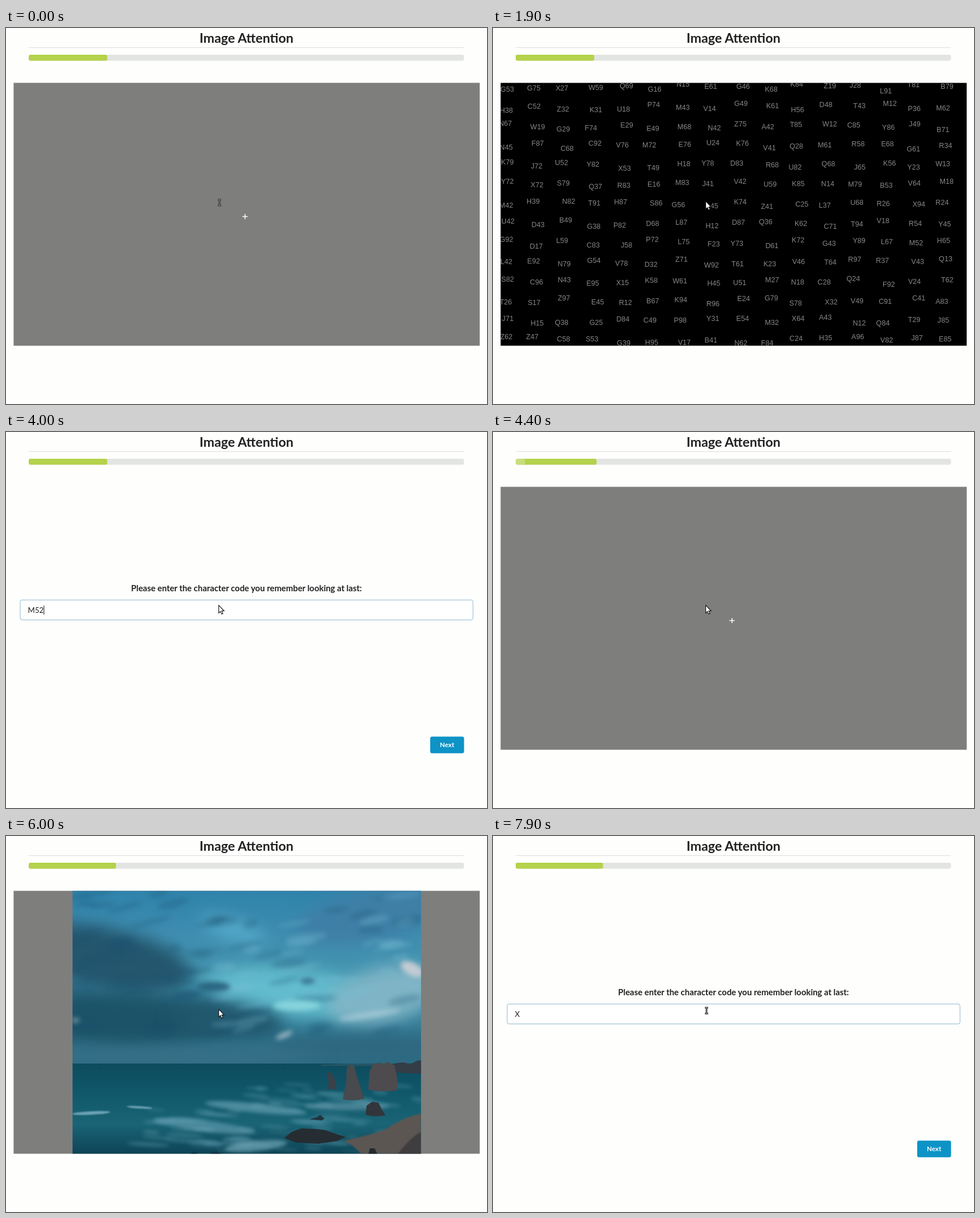
An HTML page with a canvas that plays this animation: 847 by 661 pixels, repeating every 8000 ms.

```html
<!DOCTYPE html>
<html lang="en">
<head>
<meta charset="utf-8">
<title>Image Attention</title>
<style>
html, body { margin: 0; width: 100%; height: 100%; overflow: hidden; background: #fefefd; }
svg, canvas { position: absolute; left: 0; top: 0; }
text { font-family: Lato, sans-serif; fill: #212121; }
.bold { font-weight: 700; text-anchor: middle; }
.code { font: 12.6px "Liberation Sans", Arial, sans-serif; fill: #868686; text-anchor: middle; }
</style>
</head>
<body>
<svg id="page" width="847" height="661">
  <clipPath id="frame"><rect x="13.4" y="96.4" width="820.8" height="462.2"/></clipPath>
  <text class="bold" x="423.5" y="26" font-size="23.2">Image Attention</text>
  <rect x="40" y="34" width="766.5" height="1" fill="#dededf"/>
  <rect x="40" y="47" width="766.5" height="10.5" rx="3.2" fill="#e2e5e2"/>
  <rect id="bar" x="40" y="47" height="10.5" rx="3.2" fill="#b4d24b"/>
  <rect id="glow" x="40" y="47" height="10.5" rx="3.2" fill="#fff"/>
  <rect id="grey" x="13.4" y="96.4" width="820.8" height="462.2" fill="#7e7e7c"/>
  <path id="cross" d="M416.3 331.4h9.2M420.9 326.9v9" stroke="#fff" stroke-width="1.5"/>
  <g id="form">
    <text class="bold" x="423.5" y="280" font-size="14.86">Please enter the character code you remember looking at last:</text>
    <rect id="field" x="25" y="295.3" width="797.3" height="35" rx="3.3" fill="#fff"/>
    <text id="typed" x="38.6" y="317.6" font-size="13.27"></text>
    <rect id="caret" y="305" width="1" height="16" fill="#111"/>
    <rect x="747" y="535.4" width="59.6" height="29.4" rx="3.3" fill="#0d93c6"/>
    <text class="bold" x="776.6" y="554.2" font-size="11.6" style="fill:#fff">Next</text>
  </g>
</svg>
<canvas id="towers" width="847" height="661"></canvas>
<canvas id="coast" width="847" height="661"></canvas>
<svg id="pointer" width="847" height="661">
  <path id="arrow" d="M374.6 304.6v13.6l3-2.8 2.1 4.7 2.3-1-2.1-4.6h4.2z" fill="#fff" stroke="#111" stroke-width="1.1"/>
  <g id="beam" fill="none">
    <path d="M373.2 301.8h5.6M376 301.8v10.4M373.2 312.2h5.6" stroke="#161616" stroke-width="2.8"/>
    <path d="M373.6 301.8h4.8M376 301.8v10.4M373.6 312.2h4.8" stroke="#b5b5b5" stroke-width=".9"/>
  </g>
</svg>
<script>
const LOOP = 8000, TAU = Math.PI * 2;
const $ = id => document.getElementById(id);
const clamp = x => Math.max(0, Math.min(1, x));

function seeded(s) {
  return () => {
    s = (s + 0x6D2B79F5) | 0;
    let t = Math.imul(s ^ (s >>> 15), 1 | s);
    t = (t + Math.imul(t ^ (t >>> 7), 61 | t)) ^ t;
    return ((t ^ (t >>> 14)) >>> 0) / 4294967296;
  };
}

// CSS "ease": cubic-bezier(.25, .1, .25, 1)
function ease(x) {
  if (x <= 0 || x >= 1) return clamp(x);
  let lo = 0, hi = 1, s;
  for (let k = 0; k < 24; k++) {
    s = (lo + hi) / 2;
    if (.75 * s * (1 - s) * (1 - s) + .75 * s * s * (1 - s) + s ** 3 < x) lo = s; else hi = s;
  }
  return .3 * s * (1 - s) * (1 - s) + 3 * s * s * (1 - s) + s ** 3;
}

/* ---------- code charts ---------- */
const CODES = [
  'Z62 Z47 C58 S53 G39 H95 V17 B41 N62 F84 C24 H35 A96 V82 J87 E85',
  'J71 H15 Q38 G25 D84 C49 P98 Y31 E54 M32 X64 A43 N12 Q84 T29 J85',
  'T26 S17 Z97 E45 R12 B67 K94 R96 E24 G79 S78 X32 V49 C91 C41 A83',
  'S82 C96 N43 E95 X15 K58 W61 H45 U51 M27 N18 C28 Q24 F92 V24 T62',
  'L42 E92 N79 G54 V78 D32 Z71 W92 T61 K23 V46 T64 R97 R37 V43 Q13',
  'G92 D17 L59 C83 J58 P72 L75 F23 Y73 D61 K72 G43 Y89 L67 M52 H65',
  'U42 D43 B49 G38 P82 D68 L87 H12 D87 Q36 K62 C71 T94 V18 R54 Y45',
  'M42 H39 N82 T91 H87 S86 G56 L45 K74 Z41 C25 L37 U68 R26 X94 R24',
  'Y72 X72 S79 Q37 R83 E16 M83 J41 V42 U59 K85 N14 M79 B53 V64 M18',
  'K79 J72 U52 Y82 X53 T49 H18 Y78 D83 R68 U82 Q68 J65 K56 Y23 W13',
  'N45 F87 C68 C92 V76 M72 E76 U24 K76 V41 Q28 M61 R58 E68 G61 R34',
  'N67 W19 G29 F74 E29 E49 M68 N42 Z75 A42 T85 W12 C85 Y86 J49 B71',
  'H38 C52 Z32 K31 U18 P74 M43 V14 G49 K61 H56 D48 T43 M12 P36 M62',
  'G53 G75 X27 W59 Q69 G16 N15 E61 G46 K68 K84 Z19 J28 L91 T81 B79'
].map(r => r.split(' '));

function addChart(id, rows, seed) {
  const rnd = seeded(seed), spread = () => (rnd() - .5) * 13;
  let out = '<rect x="13.4" y="96.4" width="820.8" height="462.2"/>';
  rows.forEach((row, r) => row.forEach((code, c) => {
    const x = 24 + 51.4 * c + spread() * (c ? 1 : .4), y = 109 + 34.1 * r + spread() * .9;
    out += `<text class="code" x="${x.toFixed(1)}" y="${y.toFixed(1)}">${code}</text>`;
  }));
  const g = document.createElementNS('http://www.w3.org/2000/svg', 'g');
  g.id = id;
  g.setAttribute('clip-path', 'url(#frame)');
  g.innerHTML = out;
  $('page').append(g);
}

/* ---------- pictures ---------- */
function picture(id, x, w) {
  const c = $(id).getContext('2d');
  c.beginPath();
  c.rect(x, 96.4, w, 462.2);
  c.clip();
  return c;
}

function paintTowers() {
  const c = picture('towers', 107, 634.6);
  c.fillStyle = '#f6f7f3';
  c.fillRect(107, 96, 635, 463);

  // perspective floor: u runs sideways, v runs away from the viewer
  const spot = (u, v) => {
    const d = 1 / (.002101 + .000367 * v);
    return { x: 424 + .241 * d * u, y: d - 49, s: .241 * d };
  };
  const edge = (u, v, dir) => {
    const a = spot(u, v), b = spot(u + dir, v + 1), m = u + dir / 2;
    const hue = v >= 2 ? 245 + 8 * m : Math.abs(m) > 1.4 ? (m < 0 ? 258 : 308) : v < 0 ? 192 - 14 * m : 168 - 10 * m;
    const fade = v > 3 ? .35 : .8;
    for (const [w, al] of [[.2, .1], [.1, .22], [.025, .65]]) {
      c.strokeStyle = `hsla(${hue},60%,38%,${al * fade})`;
      c.lineWidth = Math.max(1, a.s * w);
      c.beginPath();
      c.moveTo(a.x, a.y);
      c.lineTo(b.x, b.y);
      c.stroke();
    }
    // braided hatching along the edge
    c.lineWidth = 1;
    c.strokeStyle = `hsla(${hue + 25},65%,42%,${.3 * fade})`;
    for (let k = 0; k < 1; k += .045) {
      const x = a.x + (b.x - a.x) * k, y = a.y + (b.y - a.y) * k, r = a.s * (.05 + .03 * Math.sin(k * 40));
      c.beginPath();
      c.moveTo(x - r * 1.2, y - r * .5 * dir);
      c.lineTo(x + r * 1.2, y + r * .5 * dir);
      c.stroke();
    }
  };
  const hues = {
    '0,1': [160, 75, 42, .9], '-1,0': [172, 55, 42, .75], '1,0': [108, 40, 56, .75],
    '-1,2': [272, 58, 36, .85], '1,2': [332, 48, 38, .8], '0,3': [238, 52, 40, .85],
    '-2,1': [312, 24, 50, .65], '2,1': [312, 46, 42, .75], '0,-1': [115, 36, 66, .55],
    '-3,0': [158, 26, 60, .6], '3,0': [32, 28, 62, .55],
    '-3,2': [250, 42, 52, .7], '3,2': [285, 42, 48, .7], '-2,3': [238, 46, 48, .72], '2,3': [280, 45, 48, .72]
  };
  // height and half width of a tower, in cell units
  const shape = [[.3, .34], [.42, .27], [.5, .31], [.6, .17], [.66, .22], [.74, .16],
    [.9, .205], [1.03, .17], [1.2, .07], [1.34, .06], [1.7, .1], [2.2, .14], [2.9, .15]];

  const tower = (u, v) => {
    const p = spot(u, v), dx = p.x - 424, dy = p.y - 1040, len = Math.hypot(dx, dy);
    const at = h => [p.x + dx / len * h * p.s, p.y + dy / len * h * p.s];
    const [h, s, l, al] = hues[u + ',' + v] || [242 + 9 * u, 42, 54, Math.max(.14, .85 - v * .1)];
    const ink = a => `hsla(${h},${s}%,${l}%,${a * al})`;
    const g = c.createRadialGradient(p.x, p.y, 0, p.x, p.y, p.s);
    g.addColorStop(0, ink(.34));
    g.addColorStop(1, ink(0));
    c.fillStyle = g;
    c.beginPath();
    c.ellipse(p.x, p.y, p.s * .95, p.s * .6, 0, 0, TAU);
    c.fill();
    for (let k = 0; k < 10; k++) {
      const [x, y] = at(.38 - .035 * k), r = p.s * (.25 + .07 * k);
      c.strokeStyle = ink(.62 - .045 * k);
      c.lineWidth = Math.max(.7, p.s * .018);
      c.beginPath();
      c.ellipse(x, y, r, r * .58, 0, 0, TAU);
      c.stroke();
    }
    if (v < 0) return;
    const side = dir => shape.map(([k, w]) => {
      const [x, y] = at(k);
      return [x + dir * w * p.s, y];
    });
    const left = side(-1), right = side(1).reverse();
    const [, low] = at(.3), [, top] = at(2.9);
    const f = c.createLinearGradient(0, low, 0, top);
    f.addColorStop(0, ink(.5));
    f.addColorStop(.25, ink(.95));
    f.addColorStop(.4, ink(.75));
    f.addColorStop(1, ink(v < 2 && Math.abs(u) === 1 ? 0 : .55));
    const smooth = pts => {
      for (let k = 1; k < pts.length; k++) {
        const [a, b] = pts[k - 1], [x, y] = pts[k];
        c.bezierCurveTo(a, (b + y) / 2, x, (b + y) / 2, x, y);
      }
    };
    c.beginPath();
    c.moveTo(...left[0]);
    smooth(left);
    c.lineTo(...right[0]);
    smooth(right);
    c.closePath();
    c.fillStyle = f;
    c.fill();
    c.strokeStyle = ink(.45);
    c.lineWidth = 1;
    c.stroke();
    for (const k of [.32, .44, .52, .64]) {
      const [x, y] = at(k);
      c.strokeStyle = ink(.8);
      c.beginPath();
      c.ellipse(x, y, p.s * .3, p.s * .12, 0, 0, TAU);
      c.stroke();
    }
  };
  for (let v = 8; v >= -3; v--) {
    for (let u = -8; u <= 8; u++) {
      if ((u + v) % 2) {
        if (v > -2) tower(u, v);
      } else {
        edge(u, v, 1);
        edge(u, v, -1);
      }
    }
  }
  // bright foot of the middle tower and sparks on the crossings
  c.strokeStyle = '#2df0d0';
  c.lineWidth = 1.8;
  for (const [y, rx, ry] of [[297, 19, 8], [311, 27, 9], [317, 31, 13]]) {
    c.beginPath();
    c.ellipse(424, y, rx, ry, 0, 0, TAU);
    c.stroke();
  }
  for (const [u, v] of [[0, 0], [-1, -1], [1, -1], [1, 1]]) {
    const p = spot(u, v), g = c.createRadialGradient(p.x, p.y, 0, p.x, p.y, 15);
    g.addColorStop(0, 'rgba(110,245,205,.95)');
    g.addColorStop(1, 'rgba(60,220,190,0)');
    c.fillStyle = g;
    c.fillRect(p.x - 15, p.y - 15, 30, 30);
  }
}

function paintCoast() {
  const c = picture('coast', 117.2, 613.6), rnd = seeded(12);
  const fade = (y0, y1, ...cols) => {
    const g = c.createLinearGradient(0, y0, 0, y1);
    cols.forEach((col, k) => g.addColorStop(k / (cols.length - 1), col));
    c.fillStyle = g;
    c.fillRect(117, y0, 614, y1 - y0);
  };
  const blob = (x, y, rx, ry, col, tilt = 0) => {
    c.fillStyle = col;
    c.beginPath();
    c.ellipse(x, y, rx, ry, tilt, 0, TAU);
    c.fill();
  };
  const poly = (col, d) => {
    c.fillStyle = col;
    c.fill(new Path2D(d));
  };
  fade(96, 402, '#2f83ab', '#3f8db0', '#4696b0', '#37809a', '#2c6b82');

  c.filter = 'blur(14px)';
  blob(500, 275, 150, 42, '#62bccd', .1);
  blob(665, 280, 100, 48, '#7fb4c6', -.25);
  blob(400, 165, 60, 18, '#54a9c8', .3);
  blob(640, 140, 130, 45, '#3f7fa6', -.2);
  blob(170, 215, 160, 55, '#24566e', .2);
  blob(190, 320, 210, 48, '#1d5368', .04);
  blob(390, 325, 100, 32, '#22586e', .1);
  blob(630, 370, 170, 20, '#2d667e');
  blob(300, 388, 260, 11, '#3a7188');
  c.filter = 'blur(4px)';
  for (let k = 0; k < 90; k++) {
    const x = 117 + 614 * rnd(), y = 100 + 250 * rnd();
    const pale = x + y * .3 > 420 && rnd() > .4;
    blob(x, y, 12 + 28 * rnd(), 3 + 6 * rnd(), pale ? 'rgba(120,190,212,.3)' : 'rgba(28,84,112,.26)', -.3 + .3 * rnd());
  }
  blob(512, 298, 42, 9, '#86d3dc');
  blob(715, 234, 22, 11, '#c3cbd3', .5);
  blob(640, 314, 55, 5, '#9fc5d2', -.15);
  blob(490, 350, 16, 4, '#a4bcc8', -.4);
  blob(365, 265, 30, 9, '#2b6680');
  blob(531, 255, 13, 5, '#35718d');
  blob(122, 324, 8, 3, '#8fa9b5');
  c.filter = 'none';

  fade(400, 559, '#0d4b5e', '#10586a', '#1a6476', '#0d4456');
  c.filter = 'blur(3px)';
  for (let k = 0; k < 90; k++) {
    const y = 436 + 122 * rnd(), x = 300 + 400 * rnd() - (y > 480 ? 90 * rnd() : -120);
    blob(x, y, 10 + 34 * rnd(), 1 + 2.6 * rnd(), 'rgba(112,170,188,.36)', .06);
  }
  blob(440, 478, 90, 8, 'rgba(115,170,190,.6)', .1);
  blob(350, 510, 90, 9, 'rgba(105,162,182,.6)', .12);
  blob(440, 545, 55, 9, 'rgba(120,172,190,.65)', -.1);
  blob(600, 475, 75, 7, 'rgba(120,165,185,.5)');
  c.filter = 'blur(1px)';
  blob(150, 487, 34, 3, '#6da3b3', -.05);
  blob(235, 477, 23, 2, '#6da3b3', .06);
  poly('#5c5653', 'M594 536Q640 526 668 516Q700 494 731 488V559H625Q615 545 594 536z');
  poly('#3f3d40', 'M690 559Q712 530 731 520V559z');
  c.filter = 'none';
  poly('#275666', 'M555 402Q610 399 680 400V404H555z');
  poly('#343c46', 'M680 404L688 399 700 398 712 401 724 395 731 394V418L684 416z');
  poly('#3c4149', 'M567 445L568 430 565 417 570 414 575 420 581 433 582 445z');
  poly('#484a4e', 'M593 463L599 434 600 408 606 402 613 404 617 420 624 440 631 462Q612 467 593 463z');
  poly('#4d4b4d', 'M638 446L640 414 646 402 657 398 664 401 672 397 684 403 688 420 690 447Q664 451 638 446z');
  poly('#32363c', 'M633 490L635 474 645 467 656 469 662 481 668 491Q650 495 633 490z');
  poly('#22333c', 'M534 498L548 494 553 490 561 497 556 500z');
  poly('#252d33', 'M490 531L503 520 520 514 545 515 562 517 585 525 598 529 584 536 550 541 510 539z');
  poly('#262a2e', 'M638 559L641 549 649 549 654 559z');
  poly('#123742', 'M325 559L331 554 338 559z M358 559L370 554 380 559z');
}

/* ---------- timeline ---------- */
addChart('chartA', CODES.slice().reverse(), 5);
addChart('chartB', CODES, 31);
paintTowers();
paintCoast();

const SCENES = [[0, 'cross'], [600, 'towers'], [1900, 'chartA'], [2300, 'form'],
  [4345, 'cross'], [5100, 'towers2'], [6400, 'chartB'], [6800, 'form']]
  .map(([at, id]) => [at, id === 'towers2' ? 'coast' : id]);
const LAYERS = ['cross', 'towers', 'coast', 'chartA', 'chartB', 'form'];
const KEYS = [[2300, ''], [2800, 'M'], [3400, 'M5'], [3900, 'M52'], [6800, ''], [7300, 'X']];
const PULSES = [-1900, 100, 2100, 4176, 6102];
const latest = (list, t) => list.filter(e => (e[0] ?? e) <= t).pop();
const show = (id, on) => { $(id).style.visibility = on ? 'visible' : 'hidden'; };
const mix = (a, b, k) => `rgb(${a.map((v, i) => Math.round(v + (b[i] - v) * k))})`;

function render(t) {
  const [since, scene] = latest(SCENES, t);
  LAYERS.forEach(id => show(id, id === scene));
  show('grey', scene !== 'form');

  const width = 138.3 + 15.5 * ease((t - 4345) / 300);
  const k = ease((t - latest(PULSES, t)) / 2000);
  $('bar').setAttribute('width', width);
  $('glow').setAttribute('width', width * k);
  $('glow').setAttribute('opacity', .3 * (1 - k));

  const form = scene === 'form';
  if (form) {
    const [at, word] = latest(KEYS, t), typed = $('typed');
    if (typed.textContent !== word) typed.textContent = word;
    $('caret').setAttribute('x', 38.6 + (word ? typed.getComputedTextLength() : 0));
    $('field').setAttribute('stroke', mix([222, 222, 223], [143, 183, 203], ease((t - since) / 100)));
    show('caret', (t - at) % 1000 < 500);
  } else show('caret', false);

  const beam = t < 600 || t >= 7200;
  show('beam', beam);
  show('arrow', !beam);
}

const start = performance.now();
function tick() {
  render((performance.now() - start) % LOOP);
  requestAnimationFrame(tick);
}
tick();
</script>
</body>
</html>
```
